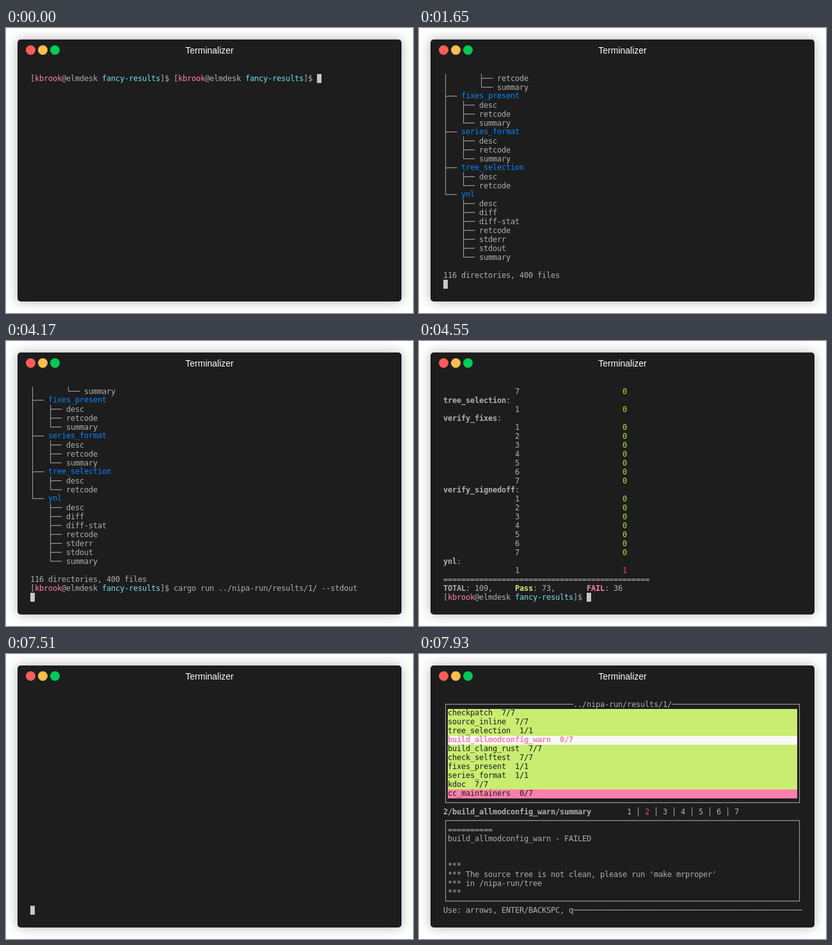
These frames come from a looping animation (636 by 446 pixels, 8000 ms). An HTML page:

```html
<!DOCTYPE html>
<html lang="en">
<head>
<meta charset="utf-8">
<title>Terminal</title>
<style>
  html, body { margin: 0; width: 100%; height: 100%; overflow: hidden; background: #fff; }
  .window {
    position: absolute; left: 18px; top: 18px; width: 600px; height: 410px;
    border-radius: 5px; background: #1d1d1d; box-shadow: 0 0 18px rgba(0, 0, 0, .3);
  }
  .dot { position: absolute; top: 9px; width: 15px; height: 15px; border-radius: 50%; }
  .title {
    position: absolute; left: 0; right: 0; top: 9px; text-align: center; color: #fff;
    font: 14px/16px "Liberation Sans", Arial, sans-serif;
  }
  pre {
    position: absolute; left: 20px; top: 54px; margin: 0; color: #afafaf;
    font: 12px/14px "DejaVu Sans Mono", monospace; letter-spacing: calc(7px - 1ch);
  }
  b { font-weight: bold; }
  .cursor { background: #c7c7c7; }
  .red { color: #fc4384; }
  .green { color: #b3e33b; }
  .pink { color: #ff7fac; }
  .lime { color: #c8ed71; }
  .sky { color: #75dff2; }
  .dir { color: #0087ff; }
  .dark { color: #1d1d1d; }
  .on-lime { background: #c8ed71; }
  .on-pink { background: #ff7fac; }
  .on-white { background: #f9f9f4; }
  .up { position: relative; top: -1px; }
</style>
</head>
<body>
<div class="window">
  <div class="dot" style="left:13px;background:#ff5c5c"></div>
  <div class="dot" style="left:32px;background:#ffbd4c"></div>
  <div class="dot" style="left:51px;background:#00ca56"></div>
  <div class="title">Terminalizer</div>
  <pre id="screen"></pre>
</div>
<script>
const LOOP = 8000, COLS = 80, ROWS = 24;
const span = (cls, text) => `<span class="${cls}">${text}</span>`;
const bold = (text, cls = '') => `<b class="${cls}">${text}</b>`;

const cursor = span('cursor', ' ');
const prompt = `[${span('pink', 'kbrook')}@elmdesk ${span('sky', 'fancy-results')}]$ `;
const path = '../nipa-run/results/1/';
const command = `cargo run ${path} --stdout`;

// Directory listing
const branch = (indent, names) =>
  names.map((name, i) => indent + (i < names.length - 1 ? '├── ' : '└── ') + name);
const folder = (name, files, last) => [
  (last ? '└── ' : '├── ') + span('dir up', name),
  ...branch(last ? '    ' : '│   ', files),
];
const tree = [
  ...branch('│       ', ['retcode', 'summary']),
  ...folder('fixes_present', ['desc', 'retcode', 'summary']),
  ...folder('series_format', ['desc', 'retcode', 'summary']),
  ...folder('tree_selection', ['desc', 'retcode']),
  ...folder('ynl', ['desc', 'diff', 'diff-stat', 'retcode', 'stderr', 'stdout', 'summary'], true),
  '',
  '116 directories, 400 files',
];

// Result table
const result = (n, code) =>
  ' '.repeat(16) + n + ' '.repeat(23) + span(code ? 'red' : 'green', code);
const group = (name, count, code = 0) => [
  bold(name) + ':',
  ...Array.from({ length: count }, (_, i) => result(i + 1, code)),
];
const table = [
  result(7, 0),
  ...group('tree_selection', 1),
  ...group('verify_fixes', 7),
  ...group('verify_signedoff', 7),
  ...group('ynl', 1, 1),
  '='.repeat(46),
  `${bold('TOTAL')}: 109,     ${bold('Pass', 'lime')}: 73,       ${bold('FAIL', 'pink')}: 36`,
];

// Interactive browser
const tests = [
  ['checkpatch', 7, 7], ['source_inline', 7, 7], ['tree_selection', 1, 1],
  ['build_allmodconfig_warn', 0, 7], ['build_clang_rust', 7, 7], ['check_selftest', 7, 7],
  ['fixes_present', 1, 1], ['series_format', 1, 1], ['kdoc', 7, 7], ['cc_maintainers', 0, 7],
];
const inner = COLS - 2;
const boxed = text => '│' + text.padEnd(inner) + '│';
const bottom = '└' + '─'.repeat(inner) + '┘';

function listRow([name, pass, total], selected) {
  const text = `${name}  ${pass}/${total}`.padEnd(inner);
  const tone = pass ? 'lime' : 'pink';
  const row = selected
    ? span('on-white', bold(text, tone + ' up'))
    : span('on-' + tone, span('dark up', text));
  return '│' + row + '│';
}

function browser(pick, patch, details = []) {
  const [name, pass, total] = tests[pick];
  const head = `${patch}/${name}/summary`;
  const tabs = Array.from({ length: total }, (_, i) =>
    i + 1 === patch ? span('red', patch) : i + 1).join(' │ ');
  const body = ['='.repeat(10), `${name} - ${pass ? 'OKAY' : 'FAILED'}`, ...details];
  while (body.length < 8) body.push('');
  const side = '─'.repeat((inner - path.length) / 2);
  const help = 'Use: arrows, ENTER/BACKSPC, q';
  return [
    '┌' + side + path + side + '┐',
    ...tests.map((test, i) => listRow(test, i === pick)),
    bottom,
    bold(head) + ' '.repeat(41 - head.length) + tabs,
    '┌' + '─'.repeat(inner) + '┐',
    ...body.map(boxed),
    bottom,
    help + '─'.repeat(COLS - help.length),
  ];
}

// Timeline: [start in ms, screen lines]
const typing = (above, keys) =>
  keys.map(([t, n]) => [t, [...above, prompt + command.slice(0, n) + cursor]]);
const first = prompt + prompt;

const steps = [
  [0, [first + cursor]],
  [980, [first + 'tr' + cursor]],
  [1150, [first + 'tree' + cursor]],
  [1300, [first + 'tree ../nipa-run', '/results/1/' + cursor]],
  [1650, [...tree, cursor]],
  ...typing(tree, [[1670, 0], [1830, 3], [2040, 5], [2220, 7], [2350, 9], [2920, 32],
    [3700, 34], [3830, 36], [4000, 38], [4090, 40]]),
  [4170, [...tree.slice(1), prompt + command, cursor]],
  [4520, [...table, cursor]],
  ...typing(table, [[4550, 0], [6550, 40], [6720, 38], [6870, 36], [7010, 34], [7210, 32]]),
  [7510, [...Array(ROWS - 1).fill(''), cursor]],
  [7610, browser(0, 1)],
  [7770, browser(2, 1)],
  [7930, browser(3, 2, ['', '', '***',
    "*** The source tree is not clean, please run 'make mrproper'",
    '*** in /nipa-run/tree', '***'])],
].map(([t, lines]) => [t, lines.join('\n')]);

const screen = document.getElementById('screen');
let shown = -1, start;

function draw(now) {
  start ??= now;
  const t = (now - start) % LOOP;
  const i = steps.findLastIndex(([at]) => at <= t);
  if (i !== shown) screen.innerHTML = steps[shown = i][1];
  requestAnimationFrame(draw);
}
draw(performance.now());
</script>
</body>
</html>
```
